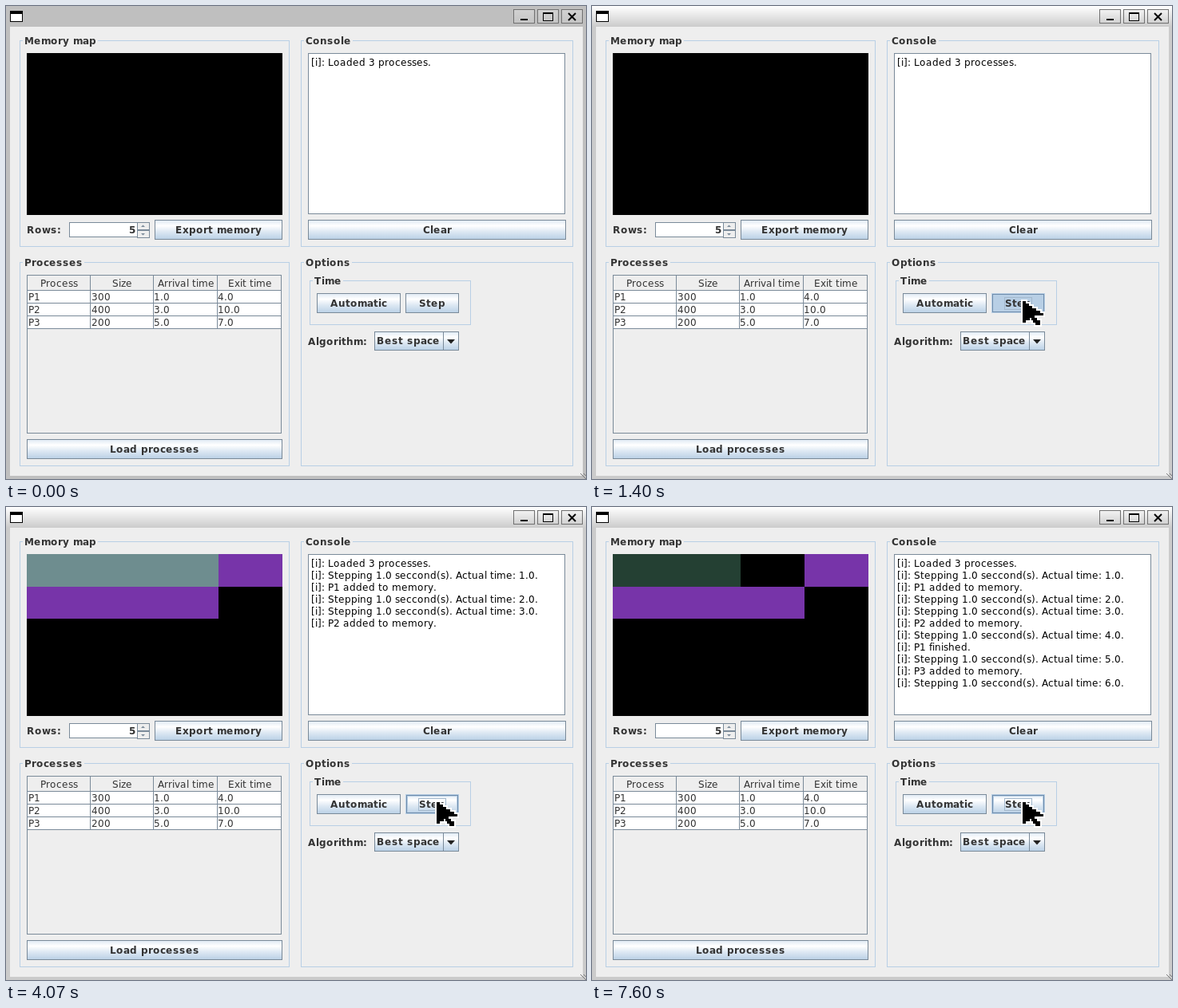
Recreate the animation shown at these times as an HTML page with a canvas. Size 726 by 593 pixels, loop 8 s.

```html
<!DOCTYPE html>
<html lang="en">
<head>
<meta charset="utf-8">
<title>Memory map</title>
<style>
  html, body { margin: 0; width: 100%; height: 100%; overflow: hidden; background: #eee; }
  canvas { display: block; width: 726px; height: 593px; }
</style>
</head>
<body>
<canvas id="stage" width="726" height="593"></canvas>
<script>
const ctx = document.getElementById("stage").getContext("2d");
const LOOP = 8000, TICK = 200 / 3;
const EDGE = "#7a8a99", SOFT = "#b8cfe5", INK = "#333", PANEL = "#eee";
const FACE = '"DejaVu Sans", sans-serif';
const MAP = { x: 26, y: 59, w: 320, h: 203, rows: 5, rowSize: 400 };

const LOG = [
  [0, "Loaded 3 processes."],
  [1470, "Stepping 1.0 seccond(s). Actual time: 1.0."],
  [1470, "P1 added to memory."],
  [2870, "Stepping 1.0 seccond(s). Actual time: 2.0."],
  [4070, "Stepping 1.0 seccond(s). Actual time: 3.0."],
  [4070, "P2 added to memory."],
  [5270, "Stepping 1.0 seccond(s). Actual time: 4.0."],
  [5270, "P1 finished."],
  [6470, "Stepping 1.0 seccond(s). Actual time: 5.0."],
  [6470, "P3 added to memory."],
  [7600, "Stepping 1.0 seccond(s). Actual time: 6.0."]
];
const BLOCKS = [
  { from: 1470, to: 5270, start: 0, size: 300, color: "#6e8d8f" },
  { from: 4070, to: LOOP, start: 300, size: 400, color: "#7734a9" },
  { from: 6470, to: LOOP, start: 0, size: 200, color: "#244033" }
];
const HEADS = ["Process", "Size", "Arrival time", "Exit time"];
const CELLS = [
  ["P1", "300", "1.0", "4.0"],
  ["P2", "400", "3.0", "10.0"],
  ["P3", "200", "5.0", "7.0"]
];
const COLS = [26, 105, 184, 264, 344];

// Pointer rows: y, left, right
const POINTER = [
  [0, 0, 4], [3, 0, 8], [6, 0, 12], [9, 0, 17], [12, 0, 22], [15, 0, 26],
  [18, 0, 15], [21, 0, 9], [21, 11, 18], [24, 0, 4], [24, 13, 22], [27, 16, 22]
];

function rect(x, y, w, h, color) {
  ctx.fillStyle = color;
  ctx.fillRect(x, y, w, h);
}

function frame(x, y, w, h, color = EDGE) {
  ctx.strokeStyle = color;
  ctx.lineWidth = 1;
  ctx.strokeRect(x + 0.5, y + 0.5, w - 1, h - 1);
}

function poly(points, color) {
  ctx.fillStyle = color;
  ctx.beginPath();
  points.forEach(([x, y]) => ctx.lineTo(x, y));
  ctx.fill();
}

// Whole-pixel advances, as in hinted desktop text
const advances = {};
function advance(ch, bold) {
  const key = ch + bold;
  if (!(key in advances)) {
    ctx.font = `${bold ? "bold " : ""}1200px ${FACE}`;
    const w = ctx.measureText(ch).width / 100;
    advances[key] = w > 12 ? Math.floor(w) : Math.round(w + (bold ? 0.37 : 0.16));
  }
  return advances[key];
}

function textWidth(str, bold) {
  return [...str].reduce((sum, ch) => sum + advance(ch, bold), 0);
}

function text(str, x, y, bold = false, color = INK) {
  const steps = [...str].map(ch => advance(ch, bold));
  ctx.font = `${bold ? "bold " : ""}12px ${FACE}`;
  ctx.fillStyle = color;
  [...str].forEach((ch, i) => {
    ctx.fillText(ch, x, y);
    x += steps[i];
  });
}

function centered(str, cx, y, bold) {
  text(str, Math.round(cx - textWidth(str, bold) / 2), y, bold);
}

function gloss(x, y, w, h) {
  const g = ctx.createLinearGradient(0, y, 0, y + h);
  g.addColorStop(0, "#dde8f3");
  g.addColorStop(0.3, "#fff");
  g.addColorStop(0.6, "#dde8f3");
  g.addColorStop(1, SOFT);
  rect(x, y, w, h, g);
}

function button(label, x, y, w, state = {}) {
  const h = 25;
  if (state.down) rect(x, y, w, h, SOFT);
  else gloss(x, y, w, h);
  if (state.hover) {
    frame(x, y, w, h, SOFT);
    frame(x + 2, y + 2, w - 4, h - 4, SOFT);
    frame(x + 1, y + 1, w - 2, h - 2, "#6f8cab");
  } else {
    frame(x, y, w, h);
  }
  if (state.focus) {
    const tw = textWidth(label, true);
    frame(Math.round(x + w / 2 - tw / 2) - 1, y + 5, tw + 2, 16, "#a3b8cc");
  }
  centered(label, x + w / 2, y + 17, true);
}

function group(title, x, y, w, h) {
  frame(x, y, w, h, SOFT);
  rect(x + 4, y, textWidth(title, true) + 4, 1, PANEL);
  text(title, x + 6, y + 5, true);
}

function windowFrame(active) {
  rect(0, 0, 726, 593, active ? "#cbcbcb" : "#bfbfbf");
  if (active) {
    const g = ctx.createLinearGradient(0, 0, 0, 26);
    g.addColorStop(0, "#fff");
    g.addColorStop(1, "#cbcbcb");
    rect(0, 0, 726, 26, g);
  }
  rect(5, 26, 717, 563, PANEL);

  rect(5, 6, 16, 14, "#000");
  rect(6, 10, 14, 9, "#fff");

  for (const x of [635, 665, 695]) {
    const g = ctx.createLinearGradient(0, 4, 0, 22);
    g.addColorStop(0, active ? "#f4f4f4" : "#d2d2d2");
    g.addColorStop(1, active ? "#d0d0d0" : "#c4c4c4");
    rect(x, 4, 27, 18, g);
    frame(x, 4, 27, 18, "#707070");
  }
  rect(644, 16, 9, 2, "#000");
  frame(672, 8, 13, 11, "#000");
  rect(672, 8, 13, 2, "#000");
  ctx.strokeStyle = "#000";
  ctx.lineWidth = 2;
  ctx.beginPath();
  ctx.moveTo(704, 9);
  ctx.lineTo(713, 18);
  ctx.moveTo(713, 9);
  ctx.lineTo(704, 18);
  ctx.stroke();

  ctx.strokeStyle = "#777";
  ctx.lineWidth = 1;
  ctx.beginPath();
  ctx.moveTo(719, 586);
  ctx.lineTo(726, 593);
  ctx.moveTo(723, 586);
  ctx.lineTo(726, 589);
  ctx.stroke();
}

function memoryPanel(t) {
  group("Memory map", 17, 43, 338, 259);
  rect(MAP.x, MAP.y, MAP.w, MAP.h, "#000");
  const edge = row => MAP.y + Math.round(row * MAP.h / MAP.rows);
  const scale = MAP.w / MAP.rowSize;
  for (const b of BLOCKS) {
    if (t < b.from || t >= b.to) continue;
    const end = b.start + b.size;
    for (let pos = b.start; pos < end;) {
      const row = Math.floor(pos / MAP.rowSize);
      const stop = Math.min(end, (row + 1) * MAP.rowSize);
      const x = MAP.x + (pos - row * MAP.rowSize) * scale;
      rect(x, edge(row), (stop - pos) * scale, edge(row + 1) - edge(row), b.color);
      pos = stop;
    }
  }

  text("Rows:", 26, 285, true);
  rect(79, 271, 86, 19, "#fff");
  frame(79, 271, 86, 19);
  for (const y of [271, 281]) {
    rect(164, y, 16, 10, PANEL);
    frame(164, y, 16, 10);
  }
  poly([[169, 277], [171.5, 274.5], [174, 277]], EDGE);
  poly([[169, 285], [171.5, 287.5], [174, 285]], EDGE);
  text("5", 154, 285, true);
  button("Export memory", 186, 268, 160);
}

function consolePanel(t) {
  group("Console", 369, 43, 341, 259);
  rect(378, 59, 322, 202, "#fff");
  frame(378, 59, 322, 202);
  LOG.forEach(([at, line], i) => {
    if (t >= at) text("[i]: " + line, 382, 75 + i * 15, false, "#000");
  });
  button("Clear", 378, 268, 323);
}

function processPanel() {
  group("Processes", 17, 321, 338, 256);
  frame(26, 337, 319, 199);
  rect(27, 357, 317, 48, "#fff");
  for (const y of [356, 372, 388, 404]) rect(26, y, 319, 1, EDGE);
  for (const x of COLS.slice(1)) rect(x, 338, 1, 67, EDGE);
  HEADS.forEach((head, i) => centered(head, (COLS[i] + COLS[i + 1]) / 2 + 1, 352));
  CELLS.forEach((row, r) => row.forEach((cell, c) => {
    text(cell, COLS[c] + (c < 2 ? 2 : 1), 369 + r * 16);
  }));
  button("Load processes", 26, 543, 320);
}

function optionsPanel(t) {
  group("Options", 369, 321, 341, 256);
  group("Time", 380, 344, 202, 56);
  button("Automatic", 389, 360, 105);
  button("Step", 500, 360, 67, {
    hover: t >= 730,
    down: t >= 1400 && t < 1470,
    focus: t >= 1400
  });
  text("Algorithm:", 378, 425, true);
  gloss(461, 408, 106, 24);
  frame(461, 408, 106, 24);
  rect(547, 409, 1, 22, EDGE);
  text("Best space", 464, 424, true);
  poly([[552, 418], [562, 418], [557, 423.5]], "#222");
}

function pointer(t) {
  const step = Math.floor((t + 4) / TICK) - 1;
  if (step < 0) return;
  const left = 1 - Math.min(step, 10) / 10;
  let x = Math.round(541 + 164 * left ** 0.73);
  let y = Math.round(364 + 208 * left ** 2);
  if (t >= 930) [x, y] = t < 1000 ? [540, 367] : [539, 370];
  for (const [dy, a, b] of POINTER) rect(x + a - 2, y + dy - 2, b - a + 4, 7, "#fff");
  for (const [dy, a, b] of POINTER) rect(x + a, y + dy, b - a, 3, "#000");
}

function draw(t) {
  windowFrame(t >= 1400);
  memoryPanel(t);
  consolePanel(t);
  processPanel();
  optionsPanel(t);
  pointer(t);
}

const began = performance.now();
function tick() {
  draw((performance.now() - began) % LOOP);
  requestAnimationFrame(tick);
}
tick();
</script>
</body>
</html>
```
